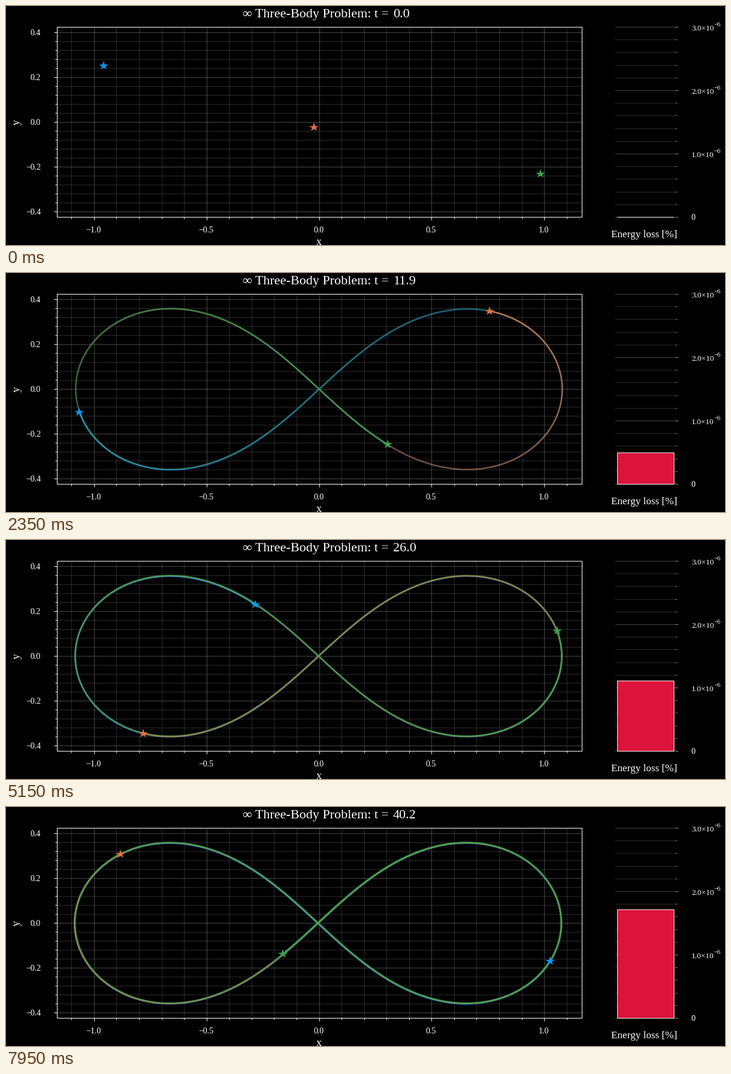
Animation of 1200 by 400 pixels, one loop 8000 ms. Source, as a matplotlib script:

```python
import numpy as np
import matplotlib.pyplot as plt
from matplotlib.animation import FuncAnimation
from matplotlib.collections import LineCollection
from matplotlib.colors import to_rgb
from matplotlib.patches import Rectangle

plt.rcParams["font.family"] = "Liberation Serif"

FRAMES, DT, SUB = 160, 0.25285, 10
STEP = DT / SUB
PERIOD = 6.32591
COLORS = ["#009afa", "#e26f46", "#3da44d"]
PX = 0.72                       # points per pixel at 100 dpi

LEFT, RIGHT, TOP, BOTTOM = 85.5, 961.5, 35.5, 353.5
CX, CY, UNIT = 523, 194.4, 375.6

PIECE = 4                       # steps per trail piece
FADE = 3.5                      # power of the opacity ramp along a trail
DRIFT = -1.8e-4


def accel(z):
    d = z[None, :] - z[:, None]
    return (d / (np.abs(d) ** 3 + np.eye(3))).sum(axis=1)


def rk4(z, v, h):
    a1 = accel(z)
    v2 = v + h / 2 * a1
    a2 = accel(z + h / 2 * v)
    v3 = v + h / 2 * a2
    a3 = accel(z + h / 2 * v2)
    v4 = v + h * a3
    a4 = accel(z + h * v3)
    return (z + h / 6 * (v + 2 * v2 + 2 * v3 + v4),
            v + h / 6 * (a1 + 2 * a2 + 2 * a3 + a4))


def solve(steps):
    """Figure-eight orbit in stage pixels, shape (steps, 3 bodies, 2)."""
    p = 0.97000436 - 0.24308753j
    w = -0.93240737 - 0.86473146j
    z, v = np.array([-p, 0, p]), np.array([-w / 2, w, -w / 2])
    lift = np.array([-0.0014j, 0, 0.0014j])
    out = []
    for i in range(steps):
        for _ in range(2):
            z, v = rk4(z, v, STEP / 2)
        out.append(z + DRIFT * STEP * i + lift)
    out = np.array(out)
    return np.stack([CX + UNIT * out.real, CY - UNIT * out.imag], axis=-1)


def loss_height(t):
    """The energy error climbs in one short ramp per sixth of a period."""
    n, f = divmod(t / (PERIOD / 6), 1)
    s = np.clip((f - 0.6) / 0.22, 0, 1)
    return 4.78 * (n + s * s * (3 - 2 * s))


fig = plt.figure(figsize=(12, 4), dpi=100, facecolor="black")
ax = fig.add_axes([0, 0, 1, 1])
ax.set(xlim=(0, 1200), ylim=(400, 0))
ax.axis("off")


def mid(v):
    """Centre of the pixel that holds v."""
    return np.floor(v) + 0.5


def line(x0, y0, x1, y1, alpha=1.0, z=1):
    ax.plot([x0, x1], [y0, y1], color="white", alpha=alpha, lw=PX,
            solid_capstyle="butt", snap=False, zorder=z)


def label(x, y, s, size, ha="left", **kw):
    kw.setdefault("va", "baseline")
    return ax.text(x, y, s, color="white", fontsize=size * PX, ha=ha,
                   zorder=9, **kw)


def signed(v):
    return f"{v:.1f}".replace("-", "\u2212")


# Main plot: grid, ticks, labels
for i in range(-11, 12):
    x, major = mid(CX + UNIT * i / 10), i % 5 == 0
    line(x, TOP, x, BOTTOM, 0.28 if major else 0.17)
    line(x, BOTTOM, x, BOTTOM + (5 if major else 3), z=2)
    if major:
        label(x - 1.5, 379, signed(i / 10), 14, "center")
for i in range(-10, 11):
    y, major = mid(CY - UNIT * i / 25), i % 5 == 0
    line(LEFT, y, RIGHT, y, 0.28 if major else 0.17)
    line(LEFT - (5 if major else 3), y, LEFT, y, z=2)
    if major:
        label(58, y + 4.5, signed(i / 25), 14, "right")
ax.add_patch(Rectangle((LEFT, TOP), RIGHT - LEFT, BOTTOM - TOP, fill=False,
                       ec="white", lw=PX, snap=False, zorder=3))
label(522, 400, "x", 18, "center")
label(18, 194.5, "y", 18, "center", va="center", rotation=90)

# Energy gauge
for i in range(16):
    y, major = mid(BOTTOM - 21.2 * i), i % 5 == 0
    line(1017, y, 1122, y, 0.28 if major else 0.17)
    line(1117, y, 1122 if major else 1120, y, 0.35)
    if major and i:
        label(1144, y + 5.5, f"{i / 5:.1f}\u00d710", 13.2)
        label(1181, y - 1, "\u22126", 10.5)
label(1143, BOTTOM + 4.5, "0", 14)
label(1065.5, 387, "Energy loss [%]", 17.1, "center")
bar = ax.add_patch(Rectangle((1020.5, BOTTOM), 94.5, 0, fc="crimson",
                             ec="white", lw=PX, snap=False, zorder=4))

label(395, 19, "\u221e Three-Body Problem: t =", 22.2)
clock = label(646, 19, "0.0", 22)

# Bodies and trails
path = solve((FRAMES - 1) * SUB + 1)
trails, stars = [], []
for j, c in enumerate(COLORS):
    trails.append(ax.add_collection(
        LineCollection([], linewidths=2.3 * PX, capstyle="butt", zorder=5 + j / 10),
        autolim=False))
    stars += ax.plot([], [], "*", color=c, ms=16 * PX, mew=0, snap=False, zorder=6)


def update(k):
    n = k * SUB
    starts = range(0, n, PIECE)
    for j, c in enumerate(COLORS):
        p = path[:n + 1, j]
        trails[j].set_segments([p[a:a + PIECE + 1] for a in starts])
        trails[j].set_color([(*to_rgb(c), min(1, (a + PIECE) / n) ** FADE)
                             for a in starts])
        stars[j].set_data([p[n, 0]], [p[n, 1]])
    h = loss_height(k * DT + STEP)
    bar.set_y(BOTTOM - h)
    bar.set_height(h)
    clock.set_text(str(float(f"{k * DT:.3g}")))
    return [*trails, *stars, bar, clock]


anim = FuncAnimation(fig, update, frames=FRAMES, interval=50, repeat=True,
                     init_func=lambda: update(0))
plt.show()
```
